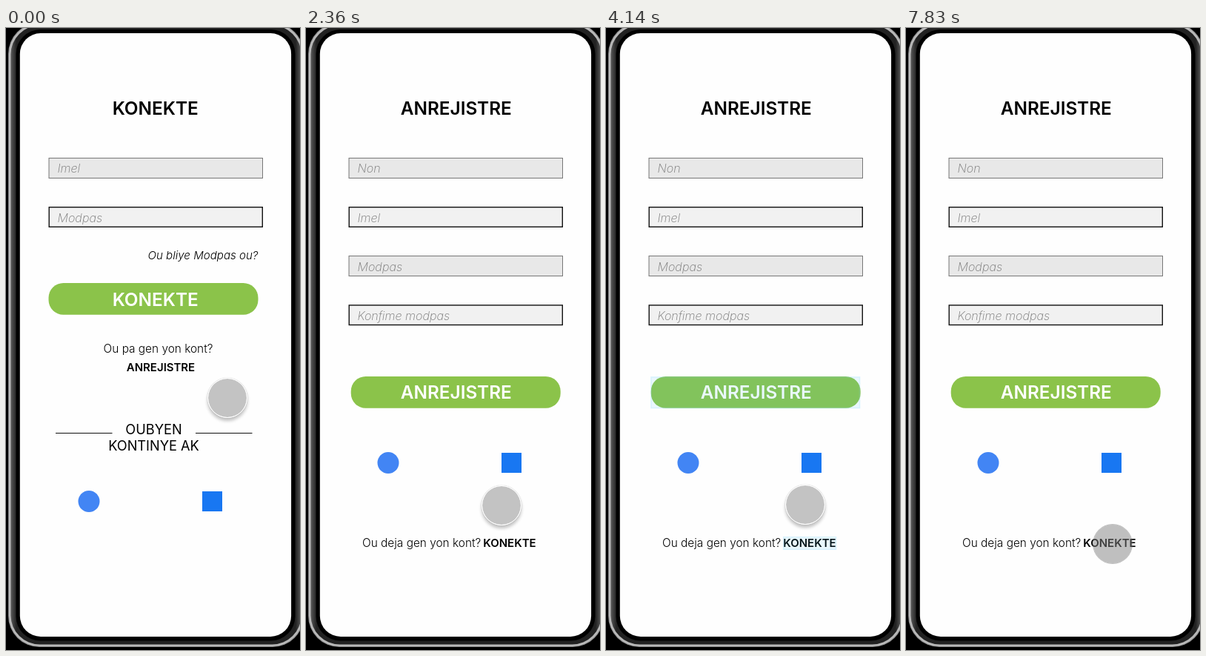
Write an HTML page that moves like this. It is 397 px wide and 839 px high and loops after 8 s.

```html
<!DOCTYPE html>
<html lang="ht">
<head>
<meta charset="utf-8">
<title>Konekte / Anrejistre</title>
<style>
  html, body { margin: 0; width: 100%; height: 100%; overflow: hidden; background: #000; }
  svg { position: absolute; inset: 0; display: block; }
  text { font: 400 15px Inter, "Liberation Sans", sans-serif; fill: #000; }
  .title { font-size: 24.35px; font-weight: 600; text-anchor: middle; }
  .on { fill: #fff; }
  .ph { font-size: 16.1px; font-weight: 200; font-style: italic; fill: #777; }
  .thin { font-size: 15.4px; font-weight: 300; }
  .it { font-size: 15.1px; font-style: italic; }
  .bold { font-weight: 600; }
  .or { font-size: 18.2px; text-anchor: middle; }
  .mid { text-anchor: middle; }
  .btn { fill: #8bc34a; }
  .soft { fill: #e8e8e8; stroke: #777; }
  .hard { fill: #f1f1f1; stroke: #111; stroke-width: 1.4; }
  .hint rect { fill: rgba(64, 198, 245, .42); stroke: #6fd0fb; stroke-width: 1.6; }

  .login, .signup, .hint, .dot, .dot i { animation: 8s step-end infinite; }
  .login { animation-name: leave; }
  .signup { animation-name: enter; }
  .hint { animation-name: hint; opacity: 0; }
  .dot { position: absolute; left: 0; top: 0; width: 55px; height: 55px; animation-name: move; }
  .dot i {
    position: absolute; inset: .5px; box-sizing: border-box; border-radius: 50%;
    border: 1.5px solid; background: padding-box;
    animation-name: press;
  }

  @keyframes leave { 0% { visibility: visible } 17.375%, 100% { visibility: hidden } }
  @keyframes enter { 0% { visibility: hidden } 17.375%, 100% { visibility: visible } }
  @keyframes hint {
    0% { opacity: 0 }
    45.125% { opacity: .55 }
    46.75% { opacity: 1 }
    48.625% { opacity: .75 }
    50.25% { opacity: .5 }
    51.75% { opacity: .26 }
    53.375% { opacity: .06 }
    55%, 100% { opacity: 0 }
  }
  @keyframes press {
    0%, 17.375%, 45.125% {
      border-color: #fff; background-color: rgba(170, 170, 170, .7);
      box-shadow: 0 0 1px rgba(0, 0, 0, .45), 0 4px 4px rgba(0, 0, 0, .24);
    }
    15.875%, 43.5%, 97.875%, 100% {
      border-color: rgba(128, 128, 128, .5); background-color: rgba(128, 128, 128, .5);
      box-shadow: none;
    }
  }
  @keyframes move {
    0% { transform: translate(271px, 471px) }
    1.625% { transform: translate(261px, 495px) }
    3.5% { transform: translate(244px, 474px) }
    5.125% { transform: translate(226px, 453px) }
    6.875% { transform: translate(216px, 440px) }
    8.75% { transform: translate(208px, 433px) }
    10.625% { transform: translate(201px, 427px) }
    12.375% { transform: translate(201px, 425px) }
    26.25% { transform: translate(204px, 452px) }
    27.875% { transform: translate(222px, 545px) }
    29.5% { transform: translate(236px, 616px) }
    31.375% { transform: translate(240px, 631px) }
    33% { transform: translate(245px, 647px) }
    34.625% { transform: translate(249px, 657px) }
    36.5% { transform: translate(251px, 657px) }
    43.5% { transform: translate(251px, 658px) }
    48.625% { transform: translate(249px, 650px) }
    50.25% { transform: translate(245px, 634px) }
    51.75% { transform: translate(241px, 615px) }
    53.375% { transform: translate(238px, 595px) }
    55% { transform: translate(236px, 575px) }
    56.625% { transform: translate(233px, 555px) }
    58.375% { transform: translate(231px, 533px) }
    60% { transform: translate(229px, 511px) }
    61.75% { transform: translate(227px, 491px) }
    63.375% { transform: translate(226px, 476px) }
    85.75% { transform: translate(229px, 572px) }
    87.625% { transform: translate(238px, 625px) }
    89.25% { transform: translate(246px, 668px) }
    92.5%, 100% { transform: translate(251px, 668px) }
  }
</style>
</head>
<body>
<svg width="397" height="839" viewBox="0 0 397 839">
  <defs>
    <linearGradient id="rim" gradientUnits="userSpaceOnUse" x1="7" y1="0" x2="398" y2="0">
      <stop offset="0" stop-color="#555"/>
      <stop offset=".018" stop-color="#222"/>
      <stop offset=".982" stop-color="#222"/>
      <stop offset="1" stop-color="#555"/>
    </linearGradient>
    <g id="marks">
      <circle cx="112" cy="638.5" r="14.5" fill="#4285f4"/>
      <rect x="265" y="625" width="27" height="27" fill="#1877f2"/>
    </g>
    <rect id="field" x="58" y=".5" width="288.5" height="27"/>
    <rect id="frame" x="58.2" y=".7" width="288.1" height="26.6"/>
    <rect id="pill" width="283" height="42.8" rx="20"/>
  </defs>

  <rect x="3" y="-7" width="399" height="842" rx="42" fill="#8a8a8a"/>
  <rect x="4" y="-6" width="397" height="840" rx="41" fill="#b8b8b8"/>
  <rect x="6.5" y="-3.5" width="392" height="835" rx="39" fill="url(#rim)"/>
  <rect x="13.5" y="2" width="377" height="824.5" rx="33" fill="#000"/>
  <rect x="18.8" y="7" width="366.3" height="814" rx="28" fill="#fefefe"/>

  <g class="login">
    <text class="title" x="201.7" y="117">KONEKTE</text>
    <use href="#field" y="175" class="soft"/>
    <text class="ph" x="69.5" y="195">Imel</text>
    <use href="#frame" y="241" class="hard"/>
    <text class="ph" x="69.5" y="261.5">Modpas</text>
    <text class="thin it" x="191.5" y="311.5">Ou bliye Modpas ou?</text>
    <use href="#pill" x="57.5" y="344" class="btn"/>
    <text class="title on" x="201.7" y="374.5">KONEKTE</text>
    <text class="thin mid" x="205.5" y="437.5">Ou pa gen yon kont?</text>
    <text class="bold mid" x="209" y="462.5">ANREJISTRE</text>
    <path d="M67 546.5H143.5M256 546.5H332.5" stroke="#111"/>
    <text class="or" x="199.5" y="547.5">OUBYEN</text>
    <text class="or" x="199.5" y="569.5">KONTINYE AK</text>
    <use href="#marks"/>
  </g>

  <g class="signup">
    <text class="title" x="202.8" y="117">ANREJISTRE</text>
    <use href="#field" y="175" class="soft"/>
    <text class="ph" x="69.5" y="195">Non</text>
    <use href="#frame" y="241" class="hard"/>
    <text class="ph" x="69.5" y="261.5">Imel</text>
    <use href="#field" y="307" class="soft"/>
    <text class="ph" x="69.5" y="327.5">Modpas</text>
    <use href="#frame" y="373.2" class="hard"/>
    <text class="ph" x="69.5" y="393.5">Konfime modpas</text>
    <use href="#pill" x="60.7" y="470" class="btn"/>
    <text class="title on" x="202.8" y="499.5">ANREJISTRE</text>
    <use href="#marks" x="-1" y="-52"/>
    <text class="thin" x="76" y="699.5">Ou deja gen yon kont?</text>
    <text class="bold" x="239.2" y="699.5">KONEKTE</text>
  </g>

  <g class="hint">
    <rect x="61" y="471" width="281.5" height="41.5"/>
    <rect x="239.8" y="686.8" width="70.7" height="16.4"/>
  </g>
</svg>
<div class="dot"><i></i></div>
</body>
</html>
```
